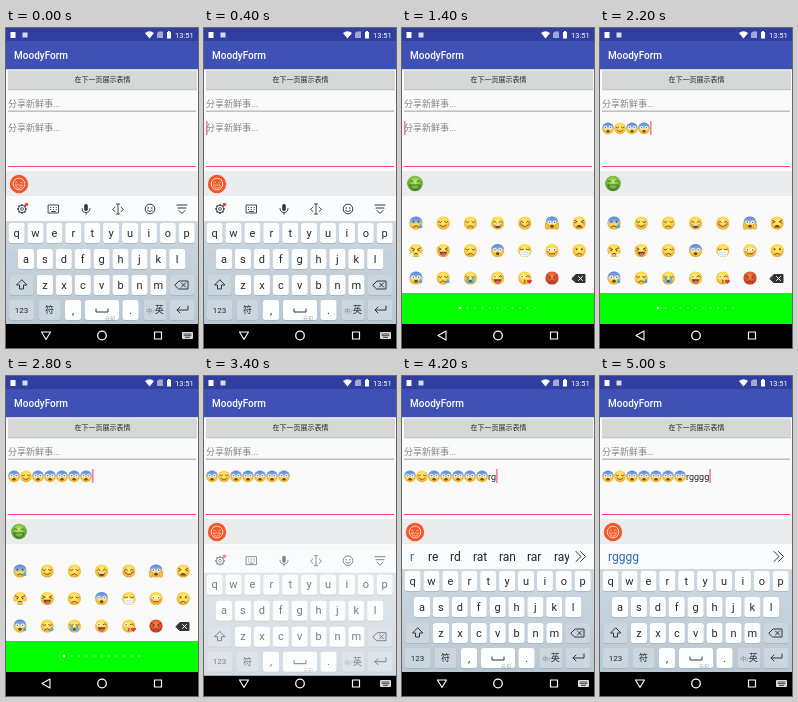
Write an HTML page that moves like this. It is 192x320 px and loops after 5200 ms.

```html
<!DOCTYPE html>
<html lang="zh">
<head>
<meta charset="utf-8">
<title>MoodyForm</title>
<style>
html, body { margin: 0; width: 100%; height: 100%; overflow: hidden; background: #fafafa; }
svg { display: block; width: 100vw; height: 100vh; }
text { font-family: Roboto, 'Noto Sans CJK SC', 'Noto Sans CJK', sans-serif; white-space: pre; }
</style>
</head>
<body>
<svg id="stage" viewBox="0 0 192 320"></svg>
<script>
const LOOP = 5200, DARK = '#30363c';

const rect = (x, y, w, h, fill, r = 0) =>
  `<rect x="${x}" y="${y}" width="${w}" height="${h}" rx="${r}" fill="${fill}"/>`;
const disc = (x, y, r, fill) => `<circle cx="${x}" cy="${y}" r="${r}" fill="${fill}"/>`;
const ring = (x, y, r, color, w = 1) =>
  `<circle cx="${x}" cy="${y}" r="${r}" fill="none" stroke="${color}" stroke-width="${w}"/>`;
const line = (d, color, w = 1, fill = 'none') =>
  `<path d="${d}" stroke="${color}" stroke-width="${w}" fill="${fill}" stroke-linecap="round" stroke-linejoin="round"/>`;
const fill = (d, color) => `<path d="${d}" fill="${color}"/>`;
const text = (x, y, size, color, str, extra = '') =>
  `<text x="${x}" y="${y}" font-size="${size}" fill="${color}" ${extra}>${str}</text>`;
const mid = 'text-anchor="middle"';
const at = (x, y, body, scale = 1) => `<g transform="translate(${x} ${y}) scale(${scale})">${body}</g>`;
const group = (id, body) => `<g id="${id}">${body}</g>`;

// Face parts, drawn on a disc of radius 10
const INK = '#75461a';
const ink = (d, w = 1.4) => line(d, INK, w);
const twice = f => f(-4) + f(4);
const eyes = {
  dot: twice(x => disc(x, -2, 1.5, INK)),
  shut: ink('M-7-2q2.5 3 5 0M2-2q2.5 3 5 0'),
  happy: ink('M-7-1q2.5-4 5 0M2-1q2.5-4 5 0'),
  tight: ink('M-7-4l4 2-4 2M7-4l-4 2 4 2'),
  wide: twice(x => disc(x, -1, 2.7, '#fff') + disc(x, -1, 1.1, INK)),
  wink: disc(-4, -2, 2.5, '#fff') + disc(-4, -2, 1.2, INK) + ink('M2-2q2.5-3 5 0'),
  cross: ink('M-7-4l5 2.5M7-4l-5 2.5') + twice(x => disc(x, 0, 1.3, INK))
};
const mouths = {
  smile: ink('M-5 3q5 5 10 0'),
  grin: fill('M-6 2H6Q4 8 0 8T-6 2', INK) + fill('M-5 2H5L4 4H-4Z', '#fff'),
  frown: ink('M-4 6q4-4 8 0'),
  flat: ink('M-4 5h8'),
  open: `<ellipse cy="5" rx="2.8" ry="2.2" fill="${INK}"/>`,
  wail: fill('M-5 7Q0-2 5 7Z', INK),
  tongue: fill('M-6 2H6Q4 8 0 8T-6 2', INK) + fill('M-2 4h5v4q-2.5 3-5 0Z', '#f0608a'),
  kiss: ink('M-1 3q3 0 1 2q3 1-1 2.5'),
  mask: fill('M-8 1Q0-2 8 1L6 8Q0 11-6 8Z', '#f4f8fa') + line('M-5 3H5M-5 6H5', '#b9cbd4', .8)
};
const extras = {
  cold: disc(0, 0, 10, 'url(#chill)'),
  drop: fill('M7 1q5 6 0 7q-5-1 0-7', '#45a8f0'),
  tears: fill('M-6 0h4v8h-4ZM2 0h4v8h-4Z', '#59b5f4'),
  hands: twice(x => `<ellipse cx="${x * 1.9}" cy="5" rx="2.6" ry="5" fill="#f9c23c" stroke="#c98a22" stroke-width=".7"/>`),
  blush: twice(x => disc(x * 1.5, 2, 2, '#f5805f')),
  heart: fill('M7 9l-4-4q0-4 4-1.5q4-2.5 4 1.5Z', '#ee2f4d'),
  puff: fill('M-10 6q4-4 7 0q-1 5-7 3ZM10 6q-4-4-7 0q1 5 7 3Z', '#eef3f6')
};
const behind = ['cold', 'blush'];

function face(x, y, r, spec) {
  const [eye, mouth, ...more] = spec.split(' ');
  const pick = back => more.filter(e => extras[e] && behind.includes(e) === back).map(e => extras[e]).join('');
  const skin = more.includes('red') ? 'angry' : 'skin';
  return at(x, y, disc(0, 0, 10, `url(#${skin})`) + pick(true) + eyes[eye] + mouths[mouth] + pick(false), r / 10);
}

const PANEL = [
  ['dot frown cold drop', 'shut smile', 'shut frown', 'happy grin', 'happy smile blush', 'wide open cold hands', 'tight wail'],
  ['cross frown puff', 'tight tongue', 'shut frown', 'wide open cold', 'shut mask', 'wide flat blush', 'dot frown'],
  ['wide open cold drop', 'shut frown drop', 'shut wail tears', 'wink tongue', 'wink kiss heart', 'cross frown red']
];
const SCARED = PANEL[1][3], CALM = PANEL[0][1];

const key = (x, y, w, label, dark, size = 11) =>
  rect(x - w / 2, y - 9.5, w, 20.3, '#a3b0bb', 2.5) +
  rect(x - w / 2, y - 10, w, 20, dark ? '#cbd6de' : '#fdfefe', 2.5) +
  text(x, y + size * .34, size, '#22282d', label, mid);
const row = (letters, x, y) =>
  [...letters].map((c, i) => key(x + i * 18.9, y, 16, c)).join('');

const backspace = (x, y, bg, fg) =>
  at(x, y, line('M-7 0L-3-4H6V4H-3Z', fg, 1, bg) + line('M-.5-2l4 4m0-4l-4 4', fg));

function keyboard() {
  return rect(0, 168, 192, 128, 'url(#board)') + rect(0, 168, 192, 25, '#fafbfc') +
    row('qwertyuiop', 10.6, 205) + row('asdfghjkl', 20, 231) + row('zxcvbnm', 39, 257) +
    key(15.5, 257, 24, '', true) + line('M15.5 252l-5 5h3v4h4v-4h3Z', DARK) +
    key(176, 257, 24, '', true) + backspace(176, 257, 'none', DARK) +
    key(15.5, 282, 25, '123', true, 8) + key(43.5, 282, 22, '符', true, 9) +
    key(67, 282, 16, ',') + key(96, 282, 34, '') + line('M90 281v3h12v-3', DARK) +
    text(104, 292, 5, '#8d98a2', '云句', mid) + key(124.5, 282, 16, '.') +
    key(149, 282, 23, '<tspan font-size="6" fill="#7b8791">中/</tspan>英', true, 9) +
    key(176, 282, 25, '', true) + line('M182 278v4h-11m3-3l-3 3 3 3', DARK);
}

function tools() {
  const spokes = Array.from({ length: 8 }, (_, i) => `<path d="M0-4.8V-3.6" transform="rotate(${i * 45})" stroke="${DARK}" stroke-width="1.6"/>`);
  return at(16, 181, ring(0, 0, 3.7, DARK, .9) + ring(0, 0, 1.4, DARK, .8) + spokes.join('') + disc(4.5, -4.5, 1.8, '#f04438')) +
    at(47.5, 181, line('M-5-4H5V4H-5Z', DARK, .9) + line('M-3-1.5h.3m2.5 0h.3m2.5 0h.3M-3 .5h.3m2.5 0h.3m2.5 0h.3M-2 2.5H2', DARK, .9)) +
    at(80, 181, rect(-1.8, -5, 3.6, 7, DARK, 1.8) + line('M-4-.5q0 4 4 4t4-4M0 3.5v2', DARK, .9)) +
    at(112, 181, line('M0-5V5M-1.5-5h3M-1.5 5h3M-3-2l-2.5 2.5 2.5 2M3-2l2.5 2.5-2.5 2', DARK, .9)) +
    at(144, 181, ring(0, 0, 4.8, DARK) + disc(-1.8, -1, .8, DARK) + disc(1.8, -1, .8, DARK) + line('M-2.5 1.5q2.5 2.5 5 0', DARK, .9)) +
    at(176, 181, line('M-5-4H5M-4-1H4M-3 1.5L0 4.5 3 1.5', DARK, 1));
}

const candidates = () =>
  '<text id="words" x="8" y="185" font-size="12" fill="#2c67b0"></text>' +
  group('more', ['re', 'rd', 'rat', 'ran', 'rar', 'ray'].map((w, i) => text([26, 48, 71, 97, 125, 152][i], 185, 12, '#222', w)).join('')) +
  rect(167, 170, 25, 22, '#fafbfc') + line('M174 175.5l5 5-5 5M178.5 175.5l5 5-5 5', DARK, 1);

function panel() {
  const faces = PANEL.map((r, j) => r.map((s, i) => face(14 + i * 27.2, 195 + j * 27.5, 6.6, s)).join('')).join('');
  const dots = Array.from({ length: 11 }, (_, i) => disc(58 + i * 7.5, 280, i ? .8 : 1.3, i ? '#b8ffb8' : '#fff'));
  return rect(0, 168, 192, 97, '#fafafa') + faces + backspace(177, 250.5, '#333', '#333') +
    line('M176.5 248.5l4 4m0-4l-4 4', '#fff') + rect(0, 265, 192, 31, '#00ff00') + dots.join('');
}

const roundFace = color => line('M-5-2q1.5-2 3 0M2-2q1.5-2 3 0M-5 1.5H5Q4 6 0 6T-5 1.5', color, 1);

function defs() {
  const stops = list => list.map((c, i) => `<stop offset="${i / (list.length - 1)}" stop-color="${c}"/>`).join('');
  const ball = (id, ...c) => `<radialGradient id="${id}" cy=".38" r=".62">${stops(c)}</radialGradient>`;
  const fall = (id, ...c) => `<linearGradient id="${id}" x2="0" y2="1">${stops(c)}</linearGradient>`;
  return '<defs>' + ball('skin', '#fff185', '#ffd94f', '#e6a930') + ball('angry', '#f78a4c', '#e95a32', '#b92d1c') +
    ball('leaf', '#c6ed79', '#82c341', '#4b8b25') + fall('board', '#d2dce4', '#b9c7d2') +
    fall('chill', '#4f86e0', '#7fa9e8', '#b9cdea00', '#b9cdea00') + '</defs>';
}

function scene() {
  return defs() +
    rect(0, 0, 192, 320, '#fafafa') + rect(0, 13, 192, 28, '#3f51b5') + rect(0, 0, 192, 13, '#303f9f') +
    rect(0, 41, 192, 1, '#d0d1d8') +
    rect(4.5, 4, 5, 6, '#fff') + rect(16.5, 4.5, 5, 5, '#d5daf2') +
    fill('M139 5q4.5-3.5 9 0l-4.5 5.5Z', '#fff') +
    fill('M151 5l2-1.5h4V10h-6Z', '#9fa8d7') + rect(161, 4, 4, 6.5, '#fff') + rect(162, 3, 2, 1, '#fff') +
    text(169, 9.8, 7.5, '#fff', '13:51') + text(8, 30.5, 10, '#fff', 'MoodyForm', 'font-weight="500"') +
    rect(2, 43, 189, 19.2, '#b9baba', 1) + rect(2, 42.5, 189, 19, '#d6d7d7', 1) +
    text(96.5, 54.3, 7, '#202020', '在下一页展示表情', mid) +
    text(2, 79, 9, '#858585', '分享新鲜事...') + rect(2, 82.7, 188, .8, '#8a8a8a') +
    group('hint', text(2, 103, 9, '#858585', '分享新鲜事...')) +
    group('sent', Array.from({ length: 7 }, (_, i) => face(8 + i * 12, 100.3, 5.9, i === 1 ? CALM : SCARED)).join('')) +
    '<text id="typed" x="86" y="104" font-size="9" fill="#222"></text>' +
    rect(2, 138, 188, 1, '#ff4081') + group('cursor', rect(.3, 93, 1.1, 14, '#ff4081')) +
    rect(0, 143, 192, 25, '#ebecee') +
    group('orange', at(13, 156, disc(0, 0, 9.2, '#f4572a') + ring(0, 0, 5.8, '#ffd9ca') + at(0, 0, roundFace('#ffd9ca'), .7))) +
    group('panel', at(13, 155.5, disc(0, 0, 7.8, 'url(#leaf)') + roundFace('#3d6e20')) + panel()) +
    rect(0, 296, 192, 24, '#000') +
    group('back', line('M44 303v9l-8-4.5Z', '#fff', 1.1)) +
    group('down', line('M35.5 304h9l-4.5 7.5Z', '#fff', 1.1)) +
    ring(96, 307.5, 4.3, '#fff', 1.3) + line('M148.5 304h7v7h-7Z', '#fff', 1.2) +
    group('switch', rect(176, 304, 11, 7, '#ddd', 1) + line('M178 306h7M178 307.7h7M179.5 309.4h4', '#000', .7)) +
    group('keyboard', keyboard() + group('tools', tools()) + group('bar', candidates()) +
      group('veil', rect(0, 168, 192, 128, '#fafafa')));
}

const $ = id => document.getElementById(id);
$('stage').innerHTML = scene();
const show = (id, on) => $(id).setAttribute('visibility', on ? 'inherit' : 'hidden');
const move = (id, x, y) => $(id).setAttribute('transform', `translate(${x} ${y})`);
const within = (t, a, b) => t >= a && t < b;
// Last value whose start time has passed
const latest = (t, steps) => steps.reduce((v, [start, value]) => t >= start ? value : v, '');

function draw(t) {
  const emoji = within(t, 600, 3400);
  const entering = within(t, 3400, 3600);
  const count = t < 1600 ? 0 : Math.min(7, Math.floor((t - 1600) / 200) + 1);
  const typed = latest(t, [[3800, 'r'], [4200, 'rg'], [4400, 'rgg'], [4600, 'rggg'], [5000, 'rgggg']]);
  const word = latest(t, [[4200, 'r'], [4400, 'rg'], [4800, 'rggg'], [5000, 'rgggg']]);

  ['panel', 'back'].forEach(id => show(id, emoji));
  ['orange', 'keyboard', 'down', 'switch'].forEach(id => show(id, !emoji));

  // The keyboard is still rising and half faded when it reappears
  move('keyboard', 0, entering ? 3.7 : 0);
  $('veil').setAttribute('opacity', entering ? .4 : 0);

  show('hint', !count);
  [...$('sent').children].forEach((g, i) => g.setAttribute('visibility', i < count ? 'visible' : 'hidden'));
  $('typed').textContent = typed;
  $('words').textContent = word;
  show('tools', !emoji && !word);
  show('bar', !emoji && word);
  $('more').setAttribute('display', word === 'r' ? 'inline' : 'none');

  show('cursor', within(t, 400, 800) || within(t, 1400, 3400) || t >= 3800);
  move('cursor', 2 + count * 12 + (typed ? $('typed').getComputedTextLength() : 0), 0);
}

const begin = performance.now();
function tick() {
  draw((performance.now() - begin) % LOOP);
  requestAnimationFrame(tick);
}
tick();
</script>
</body>
</html>
```
